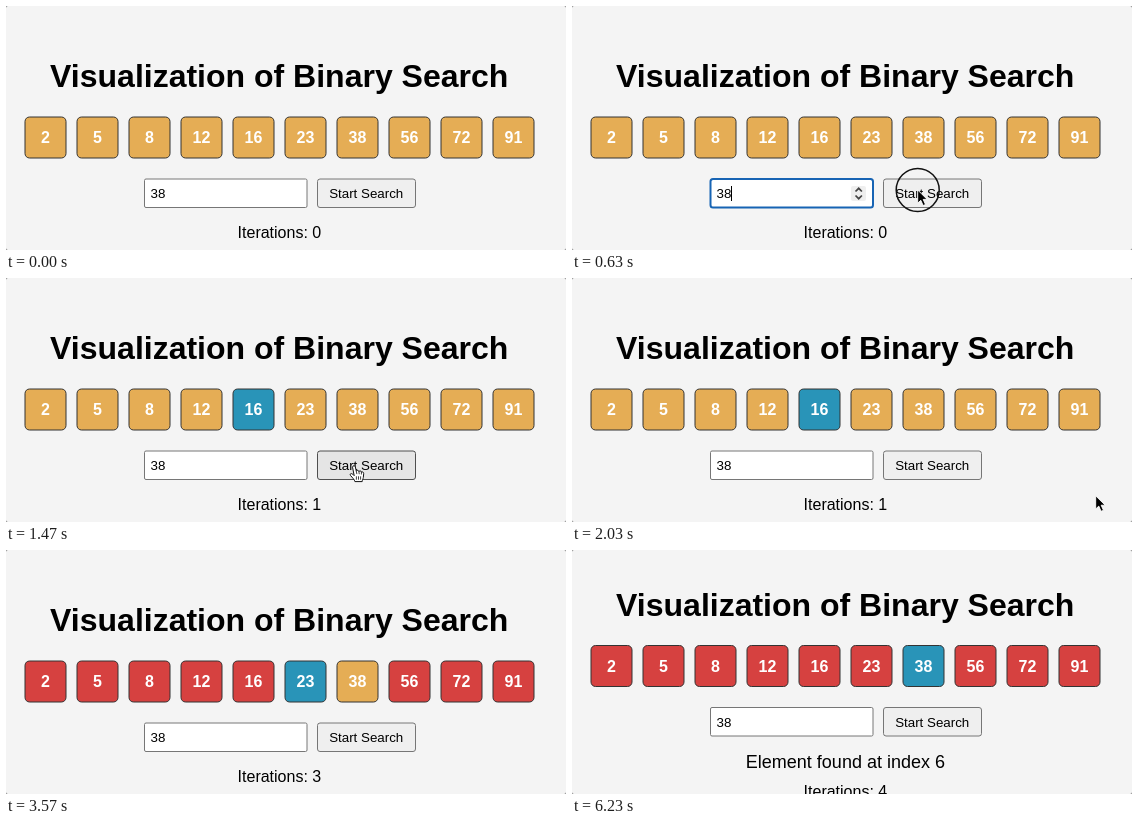
Animation of 560 by 244 pixels, one loop 6.3 s. Source, as an HTML page:

```html
<!DOCTYPE html>
<html lang="en">
<head>
<meta charset="utf-8">
<title>Visualization of Binary Search</title>
<style>
  html, body { margin: 0; width: 100%; height: 100%; overflow: hidden; background: #f4f4f4; }
  svg { display: block; font-family: "Liberation Sans", Arial, sans-serif; }
  .mid { text-anchor: middle; }
  .title { font-size: 32px; font-weight: bold; }
  .number { font-size: 16px; font-weight: bold; fill: #fff; }
  .control { font-size: 13.333px; }
</style>
</head>
<body>
<svg id="stage" width="560" height="244" viewBox="0 0 560 244">
  <rect width="560" height="244" fill="#777"/>
  <rect width="560" height="244" rx="2" fill="#f4f4f4"/>
  <g id="page">
    <text class="mid title" x="273.2" y="81">Visualization of Binary Search</text>
    <g id="blocks"></g>
    <rect id="field" fill="#fff"/>
    <text class="control" x="144.6" y="192">38</text>
    <g id="focus">
      <path d="M159.5 180V195" stroke="#000"/>
      <rect x="279" y="180" width="15" height="15" rx="2" fill="#efefef"/>
      <path d="M283.5 185.5l3.2-3.2 3.2 3.2M283.5 189.5l3.2 3.2 3.2-3.2" fill="none" stroke="#444" stroke-width="1.7"/>
    </g>
    <rect id="button" x="311.5" y="173" width="98" height="28.5" rx="2.5"/>
    <text class="mid control" x="360.2" y="192">Start Search</text>
    <text id="result" class="mid" x="273.4" y="233.5" font-size="18">Element found at index 6</text>
    <text id="count" class="mid" x="273.4" font-size="16"></text>
  </g>
  <g id="cursor">
    <circle id="press" r="21.5" fill="none" stroke="#111" stroke-width="1.5"/>
    <path id="arrow" d="M0 0V13.2L3.1 10.3 5.4 15.5 7.8 14.5 5.5 9.4H9.5Z" fill="#000" stroke="#fff" stroke-width=".9"/>
    <g id="hand" fill="#fff" stroke="#111" stroke-linejoin="round" stroke-linecap="round">
      <path d="M-1.4 .8C-1.1-.8 .9-.7 1.3 .8L2.3 5.1C2.9 3.9 4.6 4.1 4.9 5.5 5.8 4.5 7.2 4.9 7.4 6.1 8.6 5.5 9.8 6.2 9.7 7.7L9.3 11.6C9.1 13 8.3 13.6 8.2 15.6H.9C.6 13.8-1.6 11.6-3.4 9.6-4.7 7.9-2.7 6.8-1.2 8.3L-.1 9.4Z"/>
      <path d="M2.3 5.1l.5 2.6M4.9 5.5l.3 2.3M7.4 6.1l0 2M2.4 10.7v2.6M4.5 10.7v2.6M6.6 10.7v2.6" fill="none" stroke-width=".8"/>
    </g>
  </g>
</svg>
<script>
const LOOP = 6300, FRAME = 70;
const SEARCH_START = 1470, SEARCH_STEP = 1050;
const VALUES = [2, 5, 8, 12, 16, 23, 38, 56, 72, 91], TARGET = 38;
const COLORS = { open: '#e5ad55', out: '#d64140', probe: '#2994b8' };

const el = id => document.getElementById(id);
const set = (node, attrs) => {
  for (const key in attrs) node.setAttribute(key, attrs[key]);
  return node;
};
const add = (parent, tag, attrs) =>
  parent.appendChild(set(document.createElementNS('http://www.w3.org/2000/svg', tag), attrs));
const show = (id, visible) => set(el(id), { visibility: visible ? 'visible' : 'hidden' });
const progress = (t, from, to) => Math.min(1, Math.max(0, (t - from) / (to - from)));
const mix = (a, b, p) => a + (b - a) * p;

const blocks = VALUES.map((value, i) => {
  const x = 19 + 52 * i;
  const rect = add(el('blocks'), 'rect', { x, y: 111, width: 41, height: 41, rx: 4.5, stroke: '#333' });
  add(el('blocks'), 'text', { class: 'mid number', x: x + 20.5, y: 137 }).textContent = value;
  return rect;
});

// Range and probe after a number of binary search iterations.
function searchState(iterations) {
  let lo = 0, hi = VALUES.length - 1, mid = -1;
  for (let n = 0; n < iterations; n++) {
    if (mid >= 0) {
      if (VALUES[mid] < TARGET) lo = mid + 1;
      else hi = mid - 1;
    }
    mid = (lo + hi) >> 1;
  }
  return { lo, hi, mid };
}

function pointerAt(t) {
  if (t < 1120) {
    const p = 1 - (1 - progress(t, 0, 490)) ** 2;
    return { x: mix(322, 345.7, p), y: mix(246, 184, p) };
  }
  if (t < 1680) {
    const p = progress(t, 1050, 1470);
    return { x: mix(345.7, 348, p), y: mix(184, 188, p) };
  }
  const p = progress(t, 1610, 2100) ** 1.4;
  return { x: mix(348, 566, p), y: mix(188, 225, p) };
}

function render(t) {
  const iterations = t < SEARCH_START ? 0
    : Math.min(4, 1 + Math.floor((t - SEARCH_START) / SEARCH_STEP));
  const { lo, hi, mid } = searchState(iterations);
  blocks.forEach((rect, i) => set(rect, {
    fill: i === mid ? COLORS.probe : i < lo || i > hi ? COLORS.out : COLORS.open
  }));

  const found = iterations === 4;
  set(el('page'), { transform: `translate(0 ${found ? -15.5 : 0})` });
  show('result', found);
  set(el('count'), { y: found ? 262 : 231.5 }).textContent = `Iterations: ${iterations}`;

  const focused = t >= 560 && t < 1190;
  show('focus', focused);
  set(el('field'), focused
    ? { x: 138.5, y: 173, width: 162.5, height: 28.5, rx: 2.5, stroke: '#1764b4', 'stroke-width': 2 }
    : { x: 138.5, y: 173, width: 162.5, height: 28.5, rx: 1.5, stroke: '#767676', 'stroke-width': 1 });

  const { x, y } = pointerAt(t);
  const present = t >= 70 && t < 2100;
  const hover = t >= 1120 && t < 2100 && x < 410 && y < 202;
  const pressed = t >= 1190 && t < SEARCH_START;
  set(el('button'), {
    fill: pressed ? '#f5f5f5' : hover ? '#e5e5e5' : '#efefef',
    stroke: pressed ? '#8d8d8d' : hover ? '#4f4f4f' : '#767676'
  });
  set(el('cursor'), { transform: `translate(${x} ${y})` });
  show('press', pressed || (t >= 560 && t < 700));
  show('hand', present && hover);
  show('arrow', present && !hover);
}

const start = performance.now();
function tick() {
  const t = (performance.now() - start) % LOOP;
  render(Math.floor(t / FRAME) * FRAME);
  requestAnimationFrame(tick);
}
tick();
</script>
</body>
</html>
```
